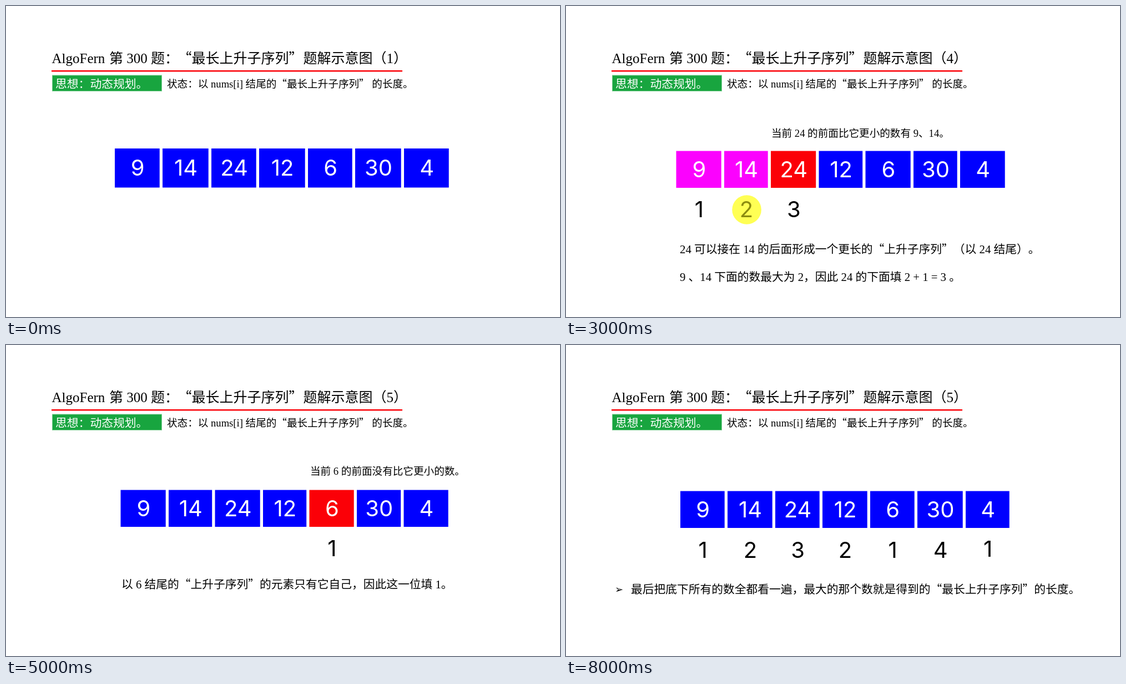
These frames come from a looping animation (998 px wide and 561 px high, 9 s). An HTML page:

```html
<!DOCTYPE html>
<html lang="zh-CN">
<head>
<meta charset="utf-8">
<style>
  html, body { margin: 0; width: 100%; height: 100%; overflow: hidden; background: #fff; }
  svg { display: block; width: 100vw; height: 100vh; }
  text { font-family: "Liberation Serif", serif; white-space: pre; text-spacing-trim: space-all; }
  .cjk { font-family: "Noto Sans CJK SC", "Noto Sans CJK", sans-serif; font-weight: 400; }
  .bold, .bold .cjk { font-weight: 500; }
  .num { font: 400 40px Inter, sans-serif; text-anchor: middle; }
  .cell { fill: #fff; }
  .bullet { font-family: "DejaVu Sans", sans-serif; }
</style>
</head>
<body>
<svg viewBox="0 0 998 561">
  <defs><filter id="soft" x="-5%" y="-20%" width="110%" height="140%"><feGaussianBlur stdDeviation=".5"/></filter></defs>
  <rect x="82" y="116" width="632" height="2.5" fill="#fb0007"/>
  <rect x="83.5" y="125" width="197" height="28.500" fill="#18a53f" stroke="#7fcf95" stroke-width="1" filter="url(#soft)"/>
  <g id="head"></g>
  <g id="slide"></g>
</svg>
<script>
const nums = [9, 14, 24, 12, 6, 30, 4];
const best = [1, 2, 3, 2, 1, 4, 1];
const STEP = 1000, BODY = 20.75, HINT = 18.6;
const RED = '#fb0007', PINK = '#fb02fe', BLUE = '#00f';

// Left edges of the cells; the last value closes the row
const rowA = [198, 282, 369, 454, 541, 626, 713, 797.5];
const rowB = [206.5, 293, 376.5, 463, 546.5, 632, 716.5, 802];
const rowC = [209, 293, 379, 463, 549, 632, 718.5, 802];

const alone = n => `以 ${n} 结尾的“上升子序列”的元素只有它自己，因此这一位填 1。`;

// hint and texts: [x, baseline, text]
const slides = [
  { row: [196, 282, 370, 456, 544, 629, 717, 803], top: 257, h: 70.5, texts: [] },
  { row: rowA, top: 260.5, hint: [204, 235, '当前 9 的前面没有数。'],
    texts: [[215, 429, alone(9)]] },
  { row: rowA, top: 260.5, bar: true, hint: [291, 235, '当前 14 的前面比它更小的数只有 9。'],
    texts: [[201, 441, '14 可以接在 9 的后面，形成一个更长的“上升子序列”（以 14 结尾） 。'],
            [201, 491, '因此 14 的下面填写 9 下面的数 + 1，即 1 + 1 = 2。']] },
  { row: [198.5, 285, 369, 455.5, 539.5, 626, 710, 796], top: 261.5, hint: [370, 236, '当前 24 的前面比它更小的数有 9、14。'],
    texts: [[205, 446, '24 可以接在 14 的后面形成一个更长的“上升子序列”（以 24 结尾）。'],
            [205, 496, '9 、14 下面的数最大为 2，因此 24 的下面填 2 + 1 = 3 。']] },
  { row: rowB.map(x => x - 2.5), top: 261.5, hint: [460, 228, '当前 12 的前面比它更小的数只有 9。'],
    texts: [[204, 446, '12 可以接在 9 的后面，从而形成一个更长的“上升子序列”（以 12 结尾）。'],
            [204, 497, '9 下面的数为 1，因此 12 的下面填 1 + 1 = 2 。']] },
  { row: rowB, top: 261.5, hint: [548, 234, '当前 6 的前面没有比它更小的数。'],
    texts: [[208, 439, alone(6)]] },
  { row: rowC, top: 261.5, hint: [633, 223, '当前 30 前面所有的数都比它更小。'],
    texts: [[20, 449, '以 30 结尾的“上升子序列” 的长度是，它的前面比它小的所有数下面的数字的最大者 + 1，即 3 + 1 = 4。'],
            [20, 500, '说明 30 可以接在以 24 结尾的“上升子序列”的后面，形成一个更长的“上升子序列”（以 30 结尾）。']] },
  { row: rowC, top: 261.5, hint: [640, 233, '当前 4 的前面没有比它更小的数。'],
    texts: [[208, 439, alone(4)]] },
  { row: [206, 291, 377, 462, 548, 633, 720, 804], top: 263.5, bullet: true,
    texts: [[117, 448, '最后把底下所有的数全都看一遍，最大的那个数就是得到的“最长上升子序列”的长度。']] }
];

const rect = (x, y, w, h, fill) => `<rect x="${x}" y="${y}" width="${w}" height="${h}" fill="${fill}"/>`;
const mixed = s => s.replace(/[^ -~]+/g, run => `<tspan class="cjk">${run}</tspan>`);
const text = (x, y, size, s, extra = '') =>
  `<text x="${x}" y="${y}" font-size="${size}" ${extra}>${mixed(s)}</text>`;
const num = (x, y, n, fill) => `<text class="num" x="${x}" y="${y}" fill="${fill}">${n}</text>`;

function drawSlide(k) {
  const { row, top, h = 66.5, hint, texts, bar, bullet } = slides[k];
  const last = k === slides.length - 1;
  const cur = k > 0 && !last ? k - 1 : -1;
  const smaller = i => i < cur && nums[i] < nums[cur];
  const peak = Math.max(...best.filter((_, i) => smaller(i)));
  const labelY = last ? 384 : 381;
  let out = text(535.5, 103, 25, `题解示意图（${Math.min(k + 1, 5)}）`);

  nums.forEach((n, i) => {
    const w = row[i + 1] - row[i] - 5.3, mid = row[i] + w / 2 + .7;
    const fill = i === cur ? RED : smaller(i) ? PINK : BLUE;
    out += rect(row[i], top, w, h, fill) + num(mid, top + h / 2 + 14, n, '#fff');
    if (!last && i !== cur && !smaller(i)) return;
    const marked = smaller(i) && best[i] === peak;
    if (marked) out += `<circle cx="${mid + .5}" cy="${labelY - 13.5}" r="26.3" fill="#ffff54"/>`;
    out += num(mid, labelY - (last && i === 6 ? 2 : 0), best[i], marked ? '#8c8c10' : '#000');
  });

  if (bar) out += rect(797.3, 258, 2.5, 69, BLUE);
  if (bullet) out += '<text class="bullet" x="88" y="447" font-size="18">➢</text>';
  if (hint) out += text(hint[0], hint[1], HINT, hint[2]);
  for (const [x, y, s] of texts) out += text(x, y, BODY, s);
  return out;
}

document.getElementById('head').innerHTML =
  text(82.5, 103, 25, 'AlgoFern') +
  text(186, 103, 25, '第 300 题：', 'class="bold"') +
  text(309.5, 103, 25, '“最长上升子序列”') +
  text(89, 148, 20.8, '思想：动态规划。', 'class="bold" fill="#fff"') +
  text(290, 147, HINT, '状态：以 nums[i] 结尾的“最长上升子序列” 的长度。');

const stage = document.getElementById('slide');
let shown = -1;
function frame() {
  const k = Math.floor(performance.now() / STEP) % slides.length;
  if (k !== shown) stage.innerHTML = drawSlide(shown = k);
  requestAnimationFrame(frame);
}
frame();
</script>
</body>
</html>
```
